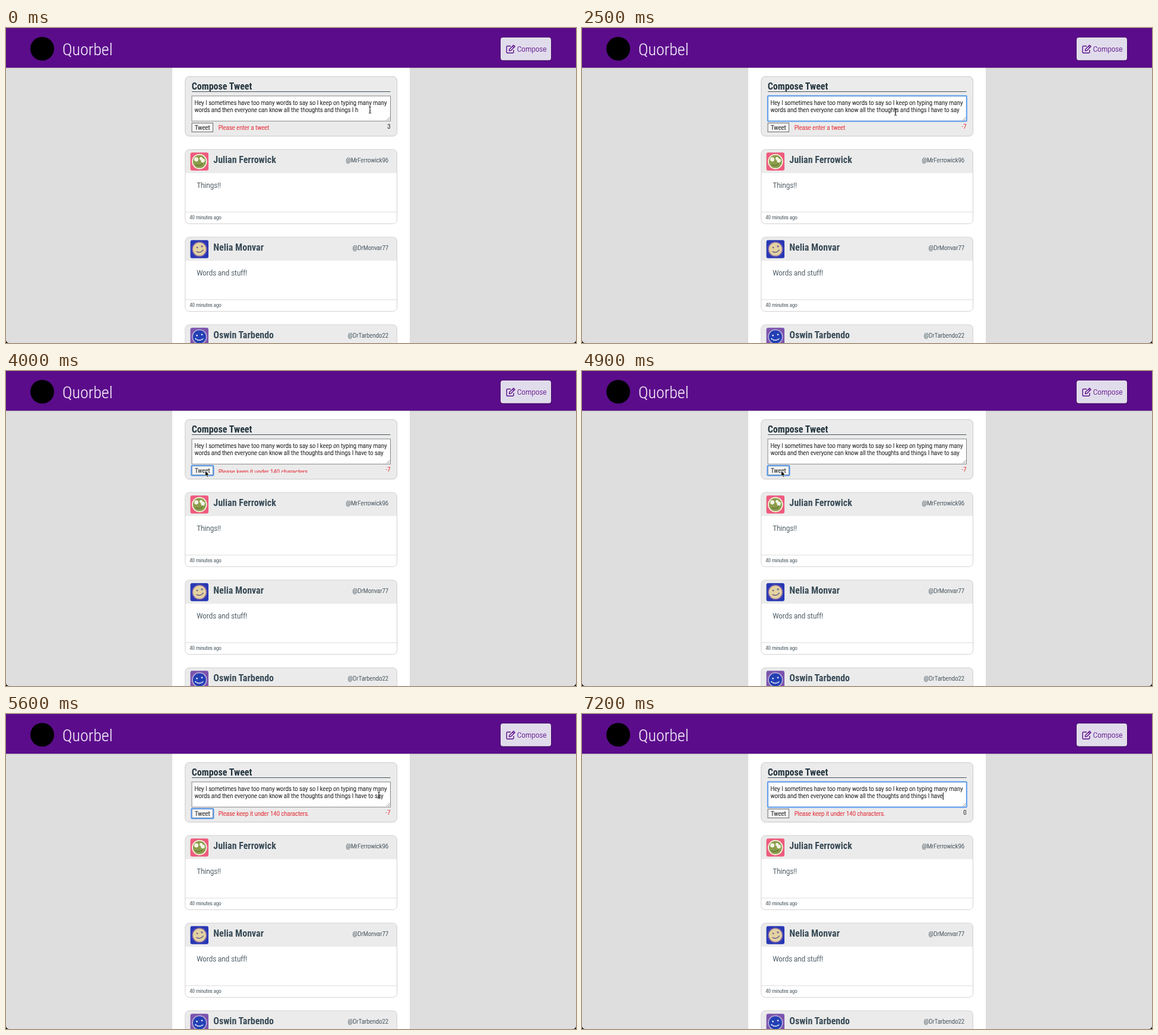
An HTML page that plays this animation: 960x532 px, repeating every 7300 ms.

```html
<!DOCTYPE html>
<html lang="en">
<head>
<meta charset="utf-8">
<title>Compose box</title>
<style>
  html, body { margin: 0; width: 100%; height: 100%; overflow: hidden; background: #000; }
  svg { display: block; width: 960px; height: 532px; border-radius: 0 0 5px 5px; }
  text {
    font: 300 10.9px "Roboto Condensed", Roboto, sans-serif;
    font-stretch: 75%;
    white-space: pre;
    fill: var(--ink, #000);
    stroke: var(--ink, #000);
    stroke-width: .18px;
  }
  .wide text { letter-spacing: -.058em; }
  .end { text-anchor: end; }
  .brand { font-size: 28px; --ink: #f3eaf8; }
  .nav { font-size: 13.4px; --ink: #5b0c8b; }
  .title, .name { font-size: 16px; font-weight: 700; stroke: none; }
  .title { --ink: #22333d; }
  .name { --ink: #384b57; }
  .handle, .body, .ago { --ink: #33444f; }
  .body { font-size: 13.25px; }
  .ago { font-size: 8.89px; }
  .error { --ink: #e3131f; }
  .ring { fill: none; stroke: #5c9cf0; stroke-width: 2; }
</style>
</head>
<body>
<svg id="stage" viewBox="0 0 960 532">
  <defs>
    <linearGradient id="shade" x2="0" y2="1">
      <stop offset="0" stop-color="#000" stop-opacity=".18"/>
      <stop offset="1" stop-color="#000" stop-opacity="0"/>
    </linearGradient>
    <clipPath id="slot"><rect id="slotBox" x="355" width="200"/></clipPath>
  </defs>

  <rect width="960" height="532" fill="#dedede"/>
  <rect x="280" width="400" height="532" fill="#fff"/>
  <rect y="67" width="960" height="2" fill="url(#shade)"/>
  <rect width="960" height="67" fill="#5b0c8b"/>
  <circle cx="61" cy="35" r="20" fill="#000"/>
  <text class="brand" x="95" y="45.5">Quorbel</text>

  <rect x="832" y="15.2" width="87" height="40.800" rx="5" fill="#2d0546" opacity=".55"/>
  <rect x="833" y="16" width="85" height="38.5" rx="4" fill="#e1dceb"/>
  <g fill="none" stroke="#5b0c8b" stroke-width="1.4" stroke-linejoin="round">
    <path d="M850 30.5h-5.3a1.5 1.5 0 0 0-1.5 1.5v8.7a1.5 1.5 0 0 0 1.5 1.5h8.7a1.5 1.5 0 0 0 1.5-1.5V37"/>
    <path d="M847.5 38.5l.5-2.7 6.8-6.8 2.3 2.3-6.8 6.8zM853 30.8l2.3 2.3"/>
  </g>
  <text class="nav" x="860.8" y="40.3">Compose</text>

  <rect x="301.8" y="82" width="356.7" height="100.7" rx="7" fill="#ebebeb" stroke="#c9c9c9"/>
  <text class="title" x="312.7" y="103.7">Compose Tweet</text>
  <path d="M313 107.5H647.5" stroke="#44525b"/>
  <rect x="313" y="114.8" width="334.5" height="42.4" fill="#fff" stroke="#858585"/>
  <path d="M641 156l5.5-5.5M644 156l2.5-2.5" stroke="#777" stroke-width=".8"/>
  <rect id="areaRing" class="ring" x="312.8" y="114.6" width="335" height="42.8" rx="1"/>
  <text id="line1" x="317.5" y="129.6">Hey I sometimes have too many words to say so I keep on typing many many</text>
  <text id="line2" x="317.5" y="142.3"></text>
  <rect id="caret" y="132.5" width="1" height="12.5"/>

  <rect x="313" y="160.5" width="35.5" height="15" fill="#f4f4f4" stroke="#6b6b6b"/>
  <rect id="buttonRing" class="ring" x="312.2" y="159.7" width="37.3" height="16.7" rx="1.5"/>
  <text x="318" y="171.6">Tweet</text>
  <g clip-path="url(#slot)"><text id="error" class="error" x="357.7"></text></g>
  <text id="count" class="end" x="647.5" y="170.4"></text>

  <g id="cards"></g>

  <path id="beam" d="M-2-5.5Q0-5.5 0-4Q0-5.5 2-5.5M0-4V4M-2 5.5Q0 5.5 0 4Q0 5.5 2 5.5M-1 1.5H1"
        fill="none" stroke="#111"/>
  <path id="arrow" d="M0 0V9.5L2.2 7.5 3.7 10.8 5.3 10.1 3.9 6.9H6.8Z" fill="#000" stroke="#fff" stroke-width=".7"/>
</svg>
<script>
const $ = id => document.getElementById(id);
const LOOP = 7300, STEP = 100, SLIDE = 400;
const base = 'words and then everyone can know all the thoughts and things I h';
const tail = 'ave to say';

const avatar = (back, ring, face, marks) => `
  <rect width="30.5" height="30.5" rx="3" fill="${back}"/>
  <circle cx="15.3" cy="15.3" r="12.8" fill="${ring}"/>
  <circle cx="15.3" cy="15.3" r="11" fill="${face}"/>${marks}`;

const faces = [
  avatar('#ee5b7c', '#f7f3e2', '#8b9d4c', `
    <g fill="#f4f4e4"><circle cx="10" cy="11.5" r="3.6"/><circle cx="18" cy="10" r="2.6"/>
    <circle cx="21" cy="13.5" r="3.4"/></g>
    <path d="M9 20q6 4 12-1" fill="none" stroke="#66793a" stroke-width="1.6"/>`),
  avatar('#2938b4', '#7e62a6', '#e2d3a0', `
    <circle cx="11.5" cy="12.5" r="1.3" fill="#6c568a"/><circle cx="19.5" cy="10.5" r="1.8" fill="#8a6ca0"/>
    <path d="M10 19q7 4 12-3" fill="none" stroke="#6c568a" stroke-width="1.4"/>`),
  avatar('#7c55ae', '#b7a4d4', '#2340b4', `
    <circle cx="11" cy="13" r="1.4" fill="#eef"/><circle cx="19.5" cy="11.5" r="1.4" fill="#eef"/>
    <path d="M8 18q7 6 14 0" fill="none" stroke="#eef" stroke-width="1.8" stroke-dasharray="3 .7"/>`)
];
const posts = [
  ['Julian Ferrowick', '@MrFerrowick96', 'Things!!'],
  ['Nelia Monvar', '@DrMonvar77', 'Words and stuff!'],
  ['Oswin Tarbendo', '@DrTarbendo22', '']
];
$('cards').innerHTML = posts.map(([name, handle, body], i) => `
  <g transform="translate(301.8 ${205.1 + i * 148})">
    <rect width="356.7" height="125.5" rx="7" fill="#fff"/>
    <path d="M0 40V7a7 7 0 0 1 7-7h342.7a7 7 0 0 1 7 7v33z" fill="#ebebeb"/>
    <path d="M0 105.8h356.7" stroke="#dcdcdc"/>
    <rect width="356.7" height="125.5" rx="7" fill="none" stroke="#d2d2d2"/>
    <g transform="translate(8.7 5.2)">${faces[i]}</g>
    <text class="name" x="47.5" y="23">${name}</text>
    <text class="handle end" x="342.3" y="22.4">${handle}</text>
    <text class="body" x="19.5" y="65">${body}</text>
    <text class="ago" x="7.5" y="118.3">40 minutes ago</text>
  </g>`).join('');

// Tighter tracking where no condensed face is available
if ($('line1').getComputedTextLength() > 336) $('stage').classList.add('wide');

const keyTimes = [900, 1100, 1200, 1400, 1500, 1600, 1700, 1900, 2000, 2100];
const eraseTimes = [6200, 6400, 6500, 6700, 6800, 6900, 7100];
const submits = [3380, 4500];
const path = [
  [0, 613, 138.5], [2200, 613, 138.5], [2500, 528, 142], [3000, 338, 167],
  [3200, 335.5, 168.5], [5100, 335.5, 168.5], [5600, 628, 137]
];

const passed = (times, t) => times.filter(k => k <= t).length;
const swing = p => .5 - Math.cos(p * Math.PI) / 2;

function pointer(t) {
  const i = path.findIndex(k => k[0] > t);
  if (i < 0) return path[path.length - 1].slice(1);
  const [t0, x0, y0] = path[i - 1], [t1, x1, y1] = path[i];
  const p = swing((t - t0) / (t1 - t0));
  return [x0 + (x1 - x0) * p, y0 + (y1 - y0) * p];
}

// The message slides shut after a submit, then open again
function opening(t) {
  const s = submits.find(k => t >= k && t < k + 2 * SLIDE);
  if (s === undefined) return 1;
  const p = (t - s) / SLIDE;
  return p < 1 ? 1 - swing(p) : swing(p - 1);
}

const typed = t => passed(keyTimes, t) - passed(eraseTimes, t);
const show = (id, on) => $(id).setAttribute('visibility', on ? 'visible' : 'hidden');

function render(t) {
  // The counter trails the typing by one step
  const left = 3 - typed(t < 2300 ? t - STEP : t);
  $('line2').textContent = base + tail.slice(0, typed(t));
  $('count').textContent = left;
  $('count').classList.toggle('error', left < 0);

  const inArea = (t >= 500 && t < submits[0]) || t >= 5800;
  const typing = (t >= 900 && t < 2200) || t >= 6200;
  show('areaRing', inArea);
  show('buttonRing', t >= submits[0] && t < 5800);
  show('caret', inArea && (typing || t % 1000 < 500));
  $('caret').setAttribute('x', 317.5 + $('line2').getComputedTextLength());

  const h = 12.6 * opening(t), top = 168 - h / 2;
  $('error').textContent = t < submits[0] ? 'Please enter a tweet' : 'Please keep it under 140 characters.';
  $('error').setAttribute('y', top + 10.1);
  $('slotBox').setAttribute('y', top);
  $('slotBox').setAttribute('height', h);

  const [x, y] = pointer(t);
  const overText = y < 157;
  show('beam', !typing && overText);
  show('arrow', !typing && !overText);
  for (const id of ['beam', 'arrow']) $(id).setAttribute('transform', `translate(${x} ${y})`);
}

const start = performance.now();
function tick(now) {
  const t = Math.max(0, now - start) % LOOP;
  render(Math.floor(t / STEP) * STEP);
  requestAnimationFrame(tick);
}
render(0);
requestAnimationFrame(tick);
</script>
</body>
</html>
```
